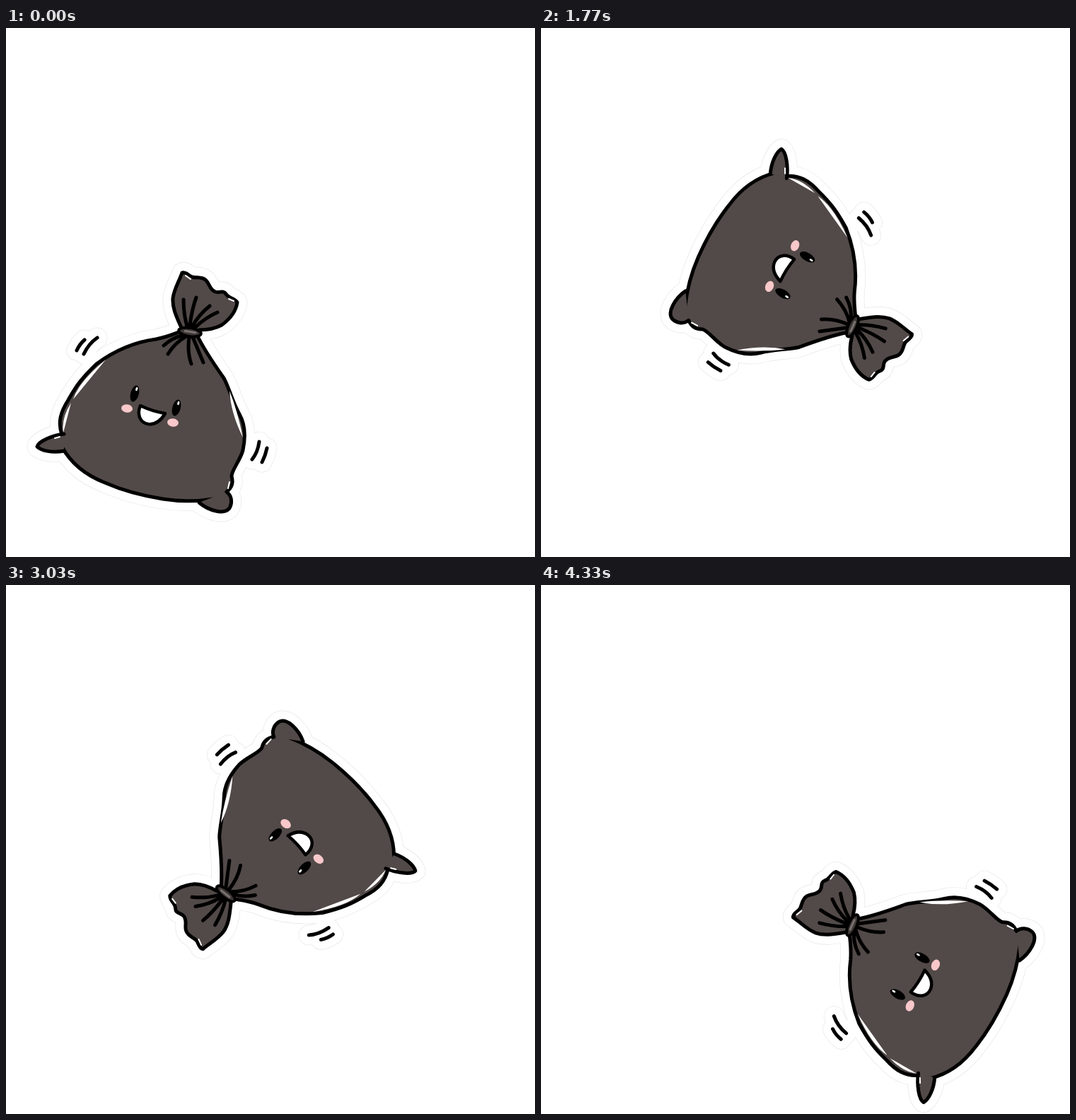
An HTML page that plays this animation: 748x748 px, repeating every 4510 ms.

```html
<!DOCTYPE html>
<html lang="en">
<head>
<meta charset="utf-8">
<title>Tumbling bag</title>
<style>
  html, body { margin: 0; height: 100%; overflow: hidden; background: #fff; }
  svg { display: block; width: 100%; height: 100%; }
  .line { fill: none; stroke: #000; stroke-width: 5; }
  .cheek { fill: #f9c8ca; }
  .glint { fill: none; stroke: #fff; stroke-width: 2; }
</style>
</head>
<body>
<svg viewBox="0 0 748 748" stroke-linecap="round" stroke-linejoin="round">
  <defs>
    <g id="contour">
      <!-- body -->
      <path d="M293 666C268 670 242 669 222 666C197 662 165 654 140 643C112 632 92 616 79 592L79 575C73 558 77 543 88 526C99 506 108 494 128 475C155 455 182 444 212 440C228 437 236 433 247 429L270 434C280 455 296 478 308 495C316 510 320 528 330 546C338 560 339 578 335 597C331 612 319 625 319 634C322 644 319 650 312 656"/>
      <!-- feet -->
      <path d="M82 574C66 576 46 584 44 592C50 598 66 601 82 598"/>
      <path d="M312 656C319 661 320 670 317 677C314 684 305 685 297 683C288 681 280 677 273 671"/>
      <!-- gathered top -->
      <path d="M248 424C241 408 235 396 236 382C238 368 244 360 249 346C254 344 258 350 263 352C270 354 277 351 283 357C288 362 288 370 296 373C302 375 307 370 311 376C315 383 323 381 327 388C325 402 316 412 305 420C294 426 284 427 273 427"/>
      <!-- wiggle marks -->
      <path fill="none" d="M100 456Q104 447 111 441M110 461Q117 446 129 438M358 585Q356 600 348 610M369 594Q367 604 362 614"/>
    </g>
  </defs>
  <g id="sticker">
    <use href="#contour" fill="#fff" stroke="#e6e6e6" stroke-width="29"/>
    <use href="#contour" fill="#fff" stroke="#fff" stroke-width="27.6"/>
    <use href="#contour" fill="#524a48" stroke="#000" stroke-width="5"/>
    <!-- unpainted slivers along the outline -->
    <path fill="#fff" d="M141 469Q103 500 95 525ZM92 530Q78 552 81 572ZM316 513Q327 540 335 579Q318 545 316 513Z"/>
    <path class="glint" d="M254 350L261 355M315 383L322 386M69 580L76 578M314 651L316 642"/>
    <!-- folds -->
    <path class="line" d="M256 422Q251 405 251 384M260 420Q263 397 269 381M264 421Q273 405 288 393M268 423Q281 410 299 402M253 434Q236 437 223 449M255 436Q239 445 229 461M259 437Q256 458 262 475M264 437Q272 456 279 473"/>
    <g transform="rotate(9 260 430)">
      <ellipse cx="260" cy="430" rx="16" ry="6" fill="#3d3735" stroke="#000" stroke-width="4"/>
      <path d="M253 429.5H268" fill="none" stroke="#777170" stroke-width="3"/>
    </g>
    <g id="eye" transform="rotate(15 182 517)">
      <ellipse cx="182" cy="517" rx="5.8" ry="11.8"/>
      <ellipse cx="183" cy="510" rx="1.5" ry="2.8" fill="#eee"/>
    </g>
    <use href="#eye" x="59" y="20"/>
    <path d="M190 534Q207 542 225 545C218 557 210 561 201 560C189 558 185 546 190 534Z" fill="#fff" stroke="#000" stroke-width="4.5"/>
    <ellipse id="cheek" class="cheek" cx="171" cy="538" rx="8" ry="5.8" transform="rotate(8 171 538)"/>
    <use href="#cheek" x="65" y="20"/>
  </g>
</svg>
<script>
  const PIVOT = { x: 235.3, y: 508.9 };
  const STEP_ANGLE = 15;
  const SKIP_FROM = 11; // the tumble leaps two extra steps here
  const SKIPPED = 2;
  const holds = [200, 270, 260, 240, 300, 260, 240, 260, 240,
                 300, 230, 230, 370, 270, 200, 230, 230, 180];
  const loop = holds.reduce((sum, hold) => sum + hold);

  // Key places of the pivot as [step, x, y]: climb, spin on the spot, slide down.
  const keys = [
    [0, PIVOT.x, PIVOT.y], [1, 313, 450], [2, 376, 379.5],
    [4, 373, 380], [10, 368.3, 374.8], [11, 370.3, 381], [13, 373, 380],
    [14, 417, 411.5], [15, 465.6, 458.5], [16, 496.4, 487.7], [17, 510.3, 525.3]
  ];
  const sticker = document.getElementById("sticker");

  function stepAt(time) {
    let step = 0;
    while (time >= holds[step]) time -= holds[step++];
    return step;
  }

  function placeAt(step) {
    const next = Math.max(1, keys.findIndex(([at]) => at >= step));
    const [from, x0, y0] = keys[next - 1];
    const [to, x1, y1] = keys[next];
    const part = (step - from) / (to - from);
    return [x0 + (x1 - x0) * part, y0 + (y1 - y0) * part];
  }

  function draw(time) {
    const step = stepAt(time % loop);
    const [x, y] = placeAt(step);
    const angle = STEP_ANGLE * (step + (step >= SKIP_FROM ? SKIPPED : 0));
    sticker.setAttribute("transform",
      `translate(${x} ${y}) rotate(${angle}) translate(${-PIVOT.x} ${-PIVOT.y})`);
  }

  const origin = performance.now();
  function tick() {
    draw(performance.now() - origin);
    requestAnimationFrame(tick);
  }
  tick();
</script>
</body>
</html>
```
